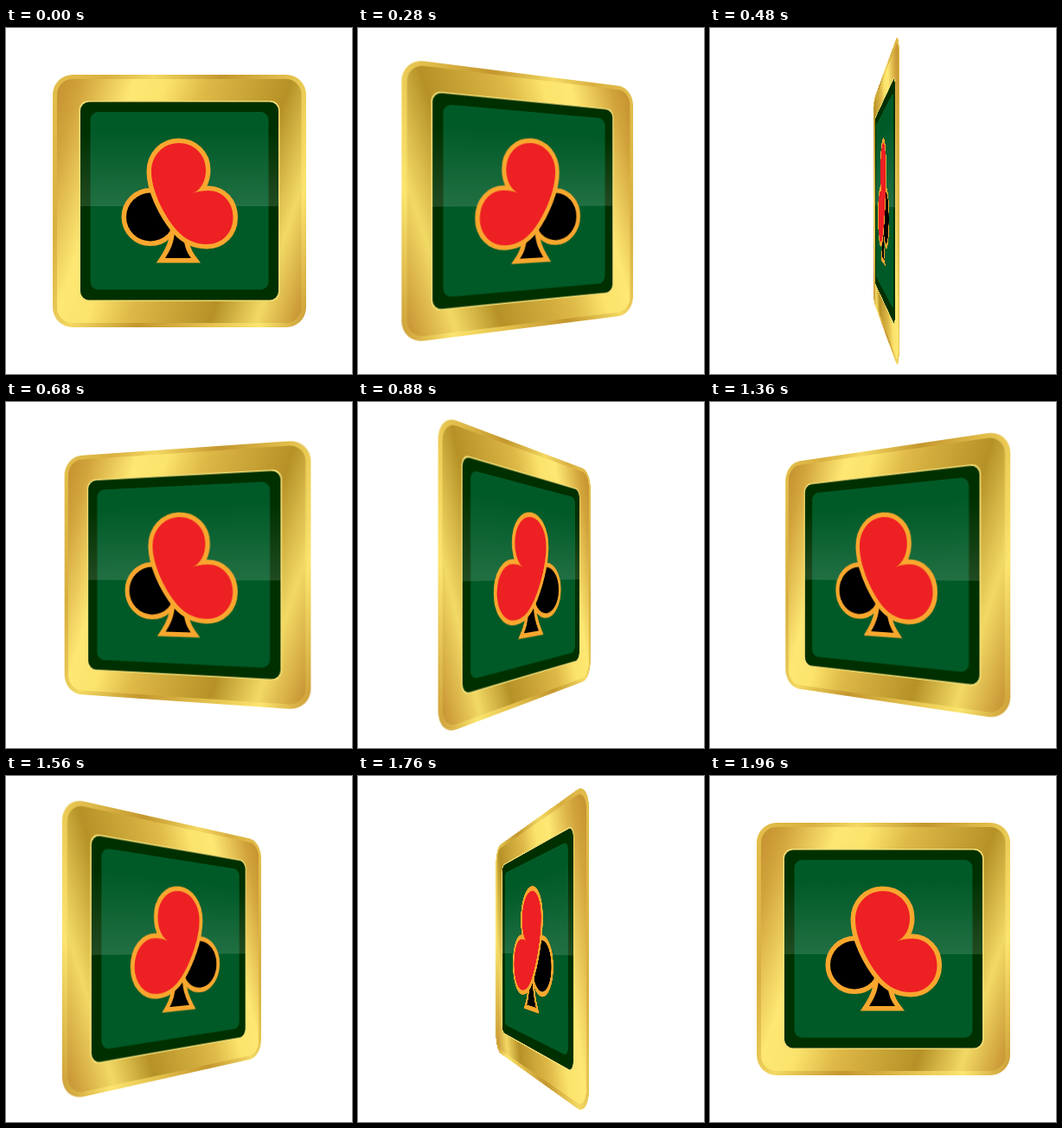
An HTML page that plays this animation: 400x400 px, repeating every 2000 ms.

```html
<!DOCTYPE html>
<html lang="en">
<head>
<meta charset="utf-8">
<title>Spinning card suit tile</title>
<style>
  html, body { margin: 0; width: 100%; height: 100%; overflow: hidden; background: #fff; }
  #stage { width: 400px; height: 400px; perspective: 555px; perspective-origin: 200px 200px; overflow: hidden; }
  #tile { display: block; transform-origin: 200px 200px; }
</style>
</head>
<body>
<div id="stage">
  <svg id="tile" width="400" height="400" viewBox="0 0 400 400">
    <defs>
      <linearGradient id="gold" x1="0" y1="0" x2="1.2" y2=".4">
        <stop offset="0" stop-color="#c4902f"/>
        <stop offset=".08" stop-color="#d2a43c"/>
        <stop offset=".24" stop-color="#fee873"/>
        <stop offset=".34" stop-color="#fbe36c"/>
        <stop offset=".46" stop-color="#dfba48"/>
        <stop offset=".72" stop-color="#b69127"/>
        <stop offset=".86" stop-color="#f2d964"/>
        <stop offset="1" stop-color="#c48f30"/>
      </linearGradient>
      <linearGradient id="bevel" x1="0" y1="0" x2="1.2" y2=".4">
        <stop offset="0" stop-color="#e3bf4b"/>
        <stop offset=".16" stop-color="#d9b040"/>
        <stop offset=".3" stop-color="#f3d862"/>
        <stop offset=".5" stop-color="#c4972e"/>
        <stop offset=".74" stop-color="#e8c752"/>
        <stop offset=".86" stop-color="#fbe56e"/>
        <stop offset="1" stop-color="#c99a33"/>
      </linearGradient>
      <linearGradient id="sheen" x1="0" y1="0" x2="0" y2="1">
        <stop offset="0" stop-color="#fff" stop-opacity="0"/>
        <stop offset="1" stop-color="#fff" stop-opacity=".13"/>
      </linearGradient>
    </defs>

    <rect x="54" y="54" width="293" height="292" rx="23" fill="url(#bevel)"/>
    <rect x="59" y="59" width="282.5" height="282" rx="18" fill="url(#gold)"/>
    <rect x="84.5" y="84" width="232" height="232" rx="11" fill="#f6df76"/>
    <rect x="86" y="85.5" width="229" height="229" rx="10" fill="#003000"/>
    <rect x="97.5" y="97" width="206" height="205.5" rx="9" fill="#005a27"/>
    <rect x="86" y="120" width="229" height="86" fill="url(#sheen)"/>

    <g stroke="#f9a72e" stroke-width="11" paint-order="stroke">
      <circle cx="167" cy="218.5" r="28"/>
      <path d="M195 236C194 248 190 257 184 266H214C208 258 206 250 205 240Z"/>
      <path fill="#ed2024" stroke-linejoin="round" d="M216 191C226 187 231 176 231 164C231 146 217 133 199.5 133C182 133 168 147 168 166C168 186 181 215 197.5 234C206.5 244 218 250 232 250C249.500 250 262.500 237 262.500 219C262.500 201 250 188 234 188C227 188 221 189 216 191Z"/>
    </g>
  </svg>
</div>
<script>
const LOOP = 2000, STEP = 40, TURNS = 3;
const lastStep = LOOP / STEP - 1;
const tile = document.getElementById("tile");

function draw(time) {
  const step = Math.floor((time % LOOP) / STEP);
  const angle = 360 * TURNS * step / lastStep;
  tile.style.transform = `rotateY(${-angle}deg)`;
}

function tick() {
  draw(performance.now());
  requestAnimationFrame(tick);
}
tick();
</script>
</body>
</html>
```
